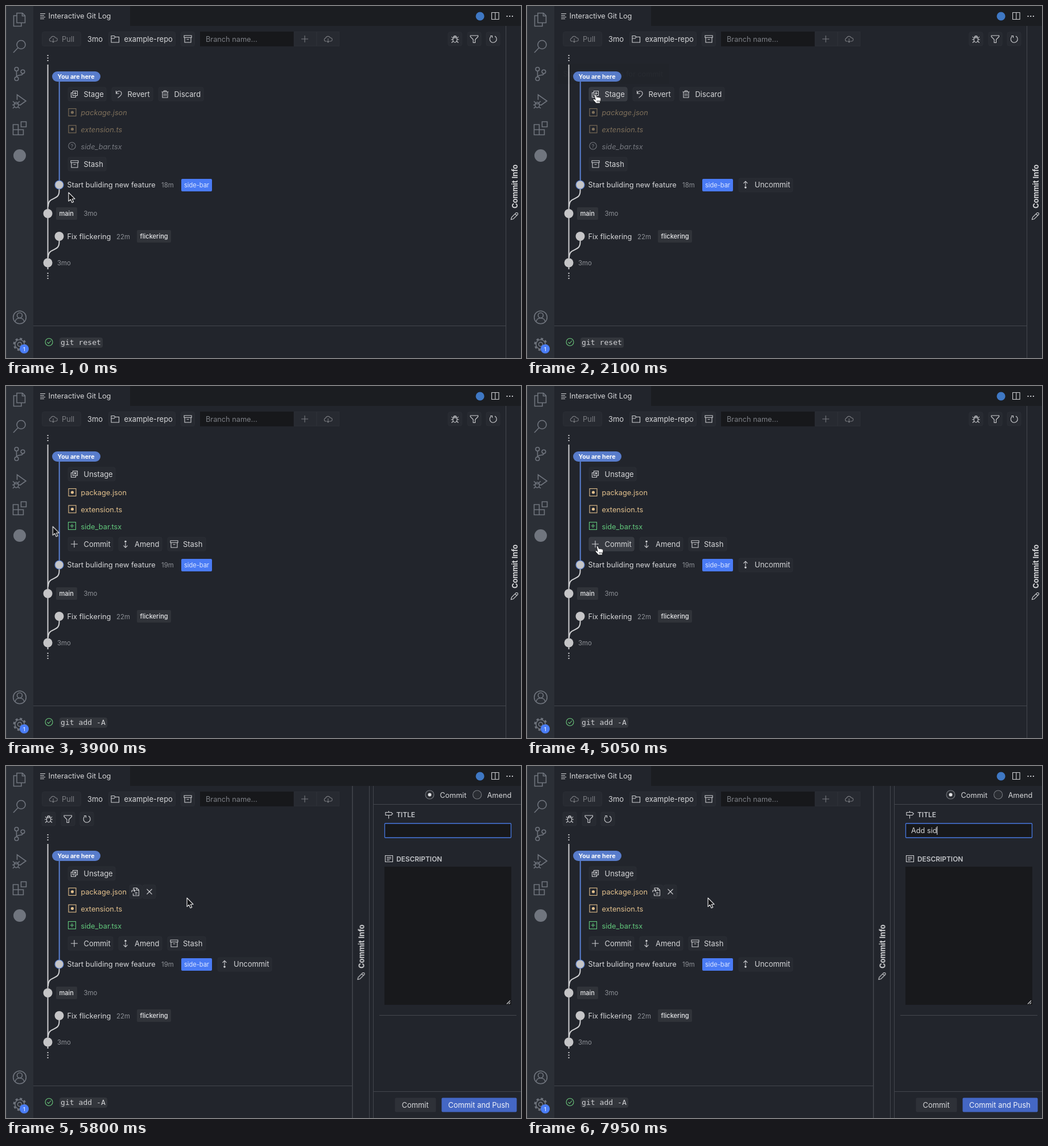
Recreate the animation shown at these times as an HTML page. Size 905 by 619 pixels, loop 8000 ms.

```html
<!DOCTYPE html>
<html lang="en">
<head>
<meta charset="utf-8">
<title>Interactive Git Log</title>
<style>
html, body { margin: 0; width: 100%; height: 100%; overflow: hidden; background: #22252c; }
svg { display: block; width: 100%; height: 100%; }
text { font: 12.75px Inter, "Open Sans", sans-serif; fill: #d6d7d9; white-space: pre; }
.btn text { font-size: 12.95px; }
.btn rect { fill: #272a31; stroke: #2b2e35; }
.btn.hot rect { fill: #373a41; stroke: #3b3e45; }
.small, .tag { font-size: 11.4px; fill: #8d9096; }
.tag { font-size: 11.05px; font-weight: 500; fill: #e6e7e9; }
.bold { font-weight: 700; }
.head { font-size: 11.9px; font-weight: 600; fill: #c3c5c9; }
.mono { font: 13.1px "DejaVu Sans Mono", monospace; fill: #d0d1d4; }
.dim { opacity: .48; }
.ital text { font-style: italic; }
.line { fill: none; stroke: currentColor; stroke-width: 1.1; }
.act { color: #70757e; }
.act .line { stroke-width: 1.6; }
.tool { color: #cfd0d3; }
.rule { stroke: #44474e; fill: none; }
.mod, .mod text { color: #e2c08d; fill: #e2c08d; }
.add, .add text { color: #62c87c; fill: #62c87c; }
.new, .new text { color: #d0d3da; fill: #d0d3da; }
.mod rect, .add rect, .new circle { fill: none; }

.sw { animation: 8s step-end infinite; }
.before { animation-name: before; }
.after { animation-name: after; }
.shift { animation-name: shift; }
.dock { animation-name: dock; }
.tools { animation-name: tools; }
.open { animation-name: open; }
.undo { animation-name: undo; }
.hot1 { animation-name: hot1; }
.hot2 { animation-name: hot2; }
.row { animation-name: row; }
.hand { animation-name: hand; }
.arrow { animation-name: arrow; }
.caret { animation-name: caret; }
.type { animation-name: type; }
.tip { animation: tip 8s linear infinite; }
.move { animation: move 8s linear infinite; }

@keyframes before { 0% { opacity: 1 } 41.25%, 100% { opacity: 0 } }
@keyframes after { 0% { opacity: 0 } 41.25%, 100% { opacity: 1 } }
@keyframes shift { 0% { transform: none } 65%, 100% { transform: translate(0, 34px) } }
@keyframes dock { 0% { transform: none } 65%, 100% { transform: translate(-269.5px, 0) } }
@keyframes tools { 0% { transform: none } 65%, 100% { transform: translate(-714px, 35px) } }
@keyframes open { 0% { opacity: 0 } 65%, 100% { opacity: 1 } }
@keyframes undo { 0% { opacity: 0 } 15% { opacity: 1 } 43.125% { opacity: 0 } 50.625%, 100% { opacity: 1 } }
@keyframes hot1 { 0% { opacity: 0 } 20% { opacity: 1 } 41.25%, 100% { opacity: 0 } }
@keyframes hot2 { 0% { opacity: 0 } 58.125% { opacity: 1 } 65%, 100% { opacity: 0 } }
@keyframes row { 0% { opacity: 0 } 70.625%, 100% { opacity: 1 } }
@keyframes hand { 0% { opacity: 0 } 20% { opacity: 1 } 41.875% { opacity: 0 } 58.125% { opacity: 1 } 65.625%, 100% { opacity: 0 } }
@keyframes arrow { 0% { opacity: 1 } 20% { opacity: 0 } 41.875% { opacity: 1 } 58.125% { opacity: 0 } 65.625%, 100% { opacity: 1 } }
@keyframes caret { 0% { opacity: 0 } 65.625% { opacity: 1 } 71.875% { opacity: 0 } 75.625%, 100% { opacity: 1 } }
@keyframes type {
  0% { transform: none }
  81.25% { transform: translate(8.7px, 0) }
  84.375% { transform: translate(16.5px, 0) }
  87.5% { transform: translate(24.3px, 0) }
  91.875% { transform: translate(27.9px, 0) }
  94.375% { transform: translate(34.6px, 0) }
  96.875% { transform: translate(37.7px, 0) }
  98.75%, 100% { transform: translate(45.3px, 0) }
}
@keyframes tip { 0%, 26.2% { opacity: 0 } 28.75%, 41.24% { opacity: 1 } 41.25%, 100% { opacity: 0 } }
@keyframes move {
  0%, 14.3% { transform: translate(110px, 328px) }
  15% { transform: translate(105px, 308px) }
  16.25% { transform: translate(88px, 234px) }
  18.125% { transform: translate(95px, 186px) }
  20% { transform: translate(115px, 161px) }
  21.875%, 41.25% { transform: translate(121px, 156px) }
  43.125% { transform: translate(84px, 182px) }
  45% { transform: translate(57px, 222px) }
  46.875% { transform: translate(62px, 246px) }
  48.75% { transform: translate(82px, 247px) }
  50% { transform: translate(103px, 254px) }
  51.25%, 56.5% { transform: translate(117px, 263px) }
  58.125% { transform: translate(122px, 276px) }
  60%, 65% { transform: translate(125px, 282px) }
  66.5% { transform: translate(152px, 278px) }
  69% { transform: translate(255px, 250px) }
  71% { transform: translate(306px, 235px) }
  72.5%, 100% { transform: translate(318px, 232px) }
}
</style>
</head>
<body>
<svg viewBox="0 0 905 619" preserveAspectRatio="none">
<defs>
  <g id="cloud" class="line"><path d="M-3 4H-4.5A2.8 2.8 0 0 1-4.3-1.5A4.3 4.3 0 0 1 3.8-2A3 3 0 0 1 4.5 4H3M0-1V6M-2.4 3.6L0 6L2.4 3.6"/></g>
  <g id="box" class="line"><path d="M-6.5-6H6.5V-2.5H-6.5ZM-5.5-2.5V6H5.5V-2.5M-2 .7H2"/></g>
  <g id="plus" class="line"><path d="M-6 0H6M0-6V6"/></g>
  <g id="bug" class="line"><ellipse cy="1" rx="3.6" ry="5"/><path d="M-3-2H3M-2.5-3A2.5 2.5 0 0 1 2.5-3M-3.5 1H-7M3.5 1H7M-3.3-1L-6-4M3.3-1L6-4M-3 4L-6 6.5M3 4L6 6.5"/></g>
  <g id="stage" class="line"><path d="M-2.5-5.5H5.5V2.5H-2.5ZM-2.5-2.5H-5.5V5.5H2.5V2.5"/></g>
  <g id="down" class="line"><path d="M0-2V6M-3.5 2.7L0 6.2L3.5 2.7"/><circle cy="-4.5" r="1.2" fill="currentColor"/></g>
  <g id="dot"><rect class="line" x="-6.5" y="-6.5" width="13" height="13"/><circle r="2.6"/></g>
  <g id="fork"><path d="M20 0V6C20 25 .5 14 .5 34" fill="none" stroke="#cfd0d2" stroke-width="2"/></g>
</defs>

<rect width="905" height="619" fill="#22252c"/>
<rect x="218" width="687" height="35" fill="#1b1d21"/>
<rect width="48" height="619" fill="#2b2f36"/>
<path d="M.5 0V619" stroke="#3a3e45"/>

<!-- activity bar -->
<g class="act">
  <g class="line">
    <path d="M19 12.5H29L33.500 17V29.500H19ZM28.500 12.500V17.500H33.500M19 17H13.500V35.500H27V29.500"/>
    <circle cx="26.500" cy="68" r="7.500"/><path d="M21 73.500L13 82"/>
    <circle cx="18.500" cy="111" r="3.300"/><circle cx="18.500" cy="128" r="3.300"/><circle cx="29.500" cy="115.500" r="3.300"/>
    <path d="M18.500 114.500V124.500M29.500 119C29.500 123 20 120 18.500 124.500"/>
    <path d="M19.500 165V156L35 167L24.500 174.500"/>
    <ellipse cx="18" cy="174" rx="3.800" ry="4.800"/><path d="M14.500 172H21.500M14 174H11M22 174H25M15 170L12 167.500M21 170L24 167.500M15 177L12 180M21 177L24 180"/>
    <path d="M12.500 208.500H21.500V217.500H12.500ZM12.500 217.500H21.500V226.500H12.500ZM21.500 217.500H30.500V226.500H21.500ZM26.500 203.500H35.500V212.500H26.500Z"/>
    <circle cx="24" cy="547.500" r="11.300"/><circle cx="24" cy="544" r="4.500"/><path d="M16 555.500C17 546.500 31 546.500 32 555.500"/>
    <circle cx="24" cy="595" r="3.600"/><circle cx="24" cy="595" r="8.200"/><circle cx="24" cy="595" r="10" stroke-width="3" stroke-dasharray="4 3.854"/>
  </g>
  <circle cx="24" cy="263" r="11" fill="#70757e"/>
  <circle cx="32" cy="603" r="8" fill="#4a7df5"/><text x="32" y="606.500" text-anchor="middle" style="font-size:9.500px;fill:#fff">1</text>
</g>

<!-- title bar -->
<g class="tool">
  <path class="line" d="M60 13.500H69M60 16.500H67M60 19.500H69M60 22.500H67"/>
  <text x="74.500" y="22">Interactive Git Log</text>
  <circle cx="833" cy="18" r="7.500" fill="#3f78c4"/>
  <path class="line" d="M853.500 11.500H866V23.500H853.500ZM859.750 11.500V23.500"/>
  <path d="M879.500 18h2m2.700 0h2m2.700 0h2" stroke="currentColor" stroke-width="2"/>
</g>

<!-- toolbar -->
<g class="tool">
  <g class="btn">
    <rect x="63.500" y="45.500" width="68" height="25" rx="3"/>
    <g class="dim"><use href="#cloud" x="83" y="58"/><text x="98" y="62.500">Pull</text></g>
    <text x="143" y="62.500">3mo</text>
    <rect x="180.500" y="45.500" width="117" height="25" rx="3"/>
    <path class="line" d="M185 52.500H190L192 54.500H198.500V64H185ZM185 57H190L192 54.500"/>
    <text x="207.500" y="62.500">example-repo</text>
    <rect x="307.500" y="45.500" width="24" height="25" rx="3"/><use href="#box" x="319.500" y="58"/>
  </g>
  <rect x="341" y="45" width="164.500" height="26" fill="#17181b"/>
  <text x="351" y="62.500" style="fill:#7c7f85">Branch name...</text>
  <g class="btn">
    <rect x="506.500" y="45.500" width="39" height="25"/><rect x="546.500" y="45.500" width="39" height="25"/>
    <g class="dim"><use href="#plus" x="525" y="58"/><use href="#cloud" x="566" y="58"/></g>
  </g>
  <g class="btn sw tools">
    <rect x="777" y="46" width="24" height="24" rx="3"/><use href="#bug" x="789" y="58"/>
    <rect x="811" y="46" width="24" height="24" rx="3"/><path class="line" d="M816 52H829.500V54L824.500 59V64.500H821V59L816 54Z"/>
    <rect x="844" y="46" width="24" height="24" rx="3"/><path class="line" d="M852.500 53.500A6 6 0 1 0 859 53M851 52.500H854.500V56"/>
  </g>
</g>

<!-- commit tree -->
<g class="sw shift tool">
  <path d="M73.500 86v2m0 2.500v2m0 2.500v2M73.500 469v2m0 2.500v2m0 2.500v2" stroke="#cfd0d2" stroke-width="2"/>
  <path d="M73.500 103V463" stroke="#cfd0d2" stroke-width="2"/>
  <path d="M93.700 130V308" stroke="#5a80d2" stroke-width="2"/>
  <use href="#fork" x="73.500" y="319"/><use href="#fork" x="73.500" y="409"/>
  <g fill="#c5c5c7">
    <circle cx="93.500" cy="314.500" r="7.500" stroke="#5a80d2" stroke-width="1.200"/>
    <circle cx="73.500" cy="365" r="8"/><circle cx="93.500" cy="405" r="8"/><circle cx="73.500" cy="451.500" r="8"/>
  </g>
  <rect x="81" y="115" width="85" height="18" rx="9" fill="#587ccb"/>
  <text class="bold" x="90.500" y="128" style="font-size:10.700px;fill:#fff">You are here</text>

  <g class="sw before">
    <g class="btn">
      <rect x="109" y="143" width="67" height="24" rx="3"/>
      <g class="hot btn sw hot1"><rect x="109" y="143" width="67" height="24" rx="3"/></g>
      <use href="#stage" x="120" y="155"/><path class="line" d="M119 153.500H124M121.500 151V156"/><text x="136.500" y="159.500">Stage</text>
      <rect x="186" y="143" width="72" height="24" rx="3"/>
      <path class="line" d="M193.500 149V154H198.500M193.800 153.500C196 148 203 149 203 154C203 157 200 159 196.500 161.500"/><text x="213.500" y="159.500">Revert</text>
      <rect x="268" y="143" width="79" height="24" rx="3"/>
      <path class="line" d="M273.500 151H285.500M277.500 151V149H281.500V151M275 151V161H284V151M278 153.500V158.500M281 153.500V158.500"/><text x="295.500" y="159.500">Discard</text>
      <rect x="109" y="266" width="67" height="24" rx="3"/><use href="#box" x="120.500" y="278"/><text x="136.500" y="283">Stash</text>
    </g>
    <g class="dim ital">
      <g class="mod"><use href="#dot" x="116.500" y="187"/><text x="131.500" y="191.500">package.json</text>
        <use href="#dot" x="116.500" y="216.500"/><text x="131.500" y="221.500">extension.ts</text></g>
      <g class="new"><circle class="line" cx="116" cy="246" r="6.200"/><text x="116" y="249.500" text-anchor="middle" style="font-size:9.500px;font-style:normal">?</text>
        <text x="131.500" y="251.500">side_bar.tsx</text></g>
    </g>
    <text class="small" x="273" y="319">18m</text>
  </g>

  <g class="sw after">
    <g class="btn">
      <rect x="109" y="143" width="83" height="24" rx="3"/><use href="#stage" x="120" y="155"/><path class="line" d="M119.500 151.500L123.500 155.500M123.500 151.500L119.500 155.500"/><text x="136.500" y="159.500">Unstage</text>
      <rect x="109" y="266" width="79" height="24" rx="3"/>
      <g class="hot btn sw hot2"><rect x="109" y="266" width="79" height="24" rx="3"/></g>
      <use href="#plus" x="120" y="278"/><text x="136.500" y="283">Commit</text>
      <rect x="198" y="266" width="76" height="24" rx="3"/><use href="#down" x="210" y="278"/><text x="226" y="283">Amend</text>
      <rect x="284" y="266" width="67" height="24" rx="3"/><use href="#box" x="295.500" y="278"/><text x="311" y="283">Stash</text>
    </g>
    <g class="mod"><use href="#dot" x="116.500" y="187"/><text x="131.500" y="191.500">package.json</text>
      <use href="#dot" x="116.500" y="216.500"/><text x="131.500" y="221.500">extension.ts</text></g>
    <g class="add"><rect class="line" x="109.500" y="239.500" width="13" height="13"/><path class="line" d="M112.500 246H119.500M116 242.500V249.500"/><text x="131.500" y="251.500">side_bar.tsx</text></g>
    <text class="small" x="273" y="319">19m</text>
  </g>

  <g class="btn sw row">
    <rect x="217" y="175" width="22" height="24" rx="3"/><rect x="240" y="175" width="23" height="24" rx="3"/>
    <path class="line" d="M224 184V180.500H230L233.500 184V194H223.500V190M229.500 180.500V184.500H233.500M221 188V185H227M225 183L227.200 185L225 187M226.500 191H231M226.500 188.500H231"/>
    <path class="line" d="M247.500 182.500L256.500 191.500M256.500 182.500L247.500 191.500"/>
  </g>

  <text x="107.500" y="319.200">Start buliding new feature</text>
  <rect x="308" y="304" width="54" height="22" rx="2" fill="#4a7bf5"/><text class="tag" x="313" y="318.500" style="font-weight:400;fill:#dce6ff">side-bar</text>
  <g class="btn sw undo">
    <rect x="372" y="303" width="95" height="24" rx="3"/>
    <g transform="translate(384 314.500) scale(1 -1)"><use href="#down"/></g><text x="400" y="319.200">Uncommit</text>
  </g>
  <rect x="88" y="354" width="37" height="22" rx="2" fill="#303339"/><text class="tag" x="93.500" y="369">main</text>
  <text class="small" x="136.500" y="369">3mo</text>
  <text x="107.500" y="410">Fix flickering</text><text class="small" x="194" y="410">22m</text>
  <rect x="230" y="394" width="60" height="22" rx="2" fill="#303339"/><text class="tag" x="235.500" y="409">flickering</text>
  <text class="small" x="90" y="456">3mo</text>
</g>

<!-- footer -->
<path class="rule" d="M48 562.500H878"/>
<g class="line" style="color:#6ccb7d"><circle cx="75.500" cy="591" r="6.500"/><path d="M72.500 591.200L74.800 593.500L79 588.500"/></g>
<g class="sw before"><rect x="94" y="583" width="76" height="18" rx="4" fill="#33363c"/><text class="mono" x="96" y="596">git reset</text></g>
<g class="sw after"><rect x="94" y="583" width="84" height="18" rx="4" fill="#33363c"/><text class="mono" x="96" y="596">git add -A</text></g>

<!-- side drawer -->
<g class="sw dock tool">
  <rect x="878" y="35" width="300" height="584" fill="#22252c"/>
  <path class="rule" d="M878.500 35V619"/>
  <text class="bold" transform="translate(898.800 356) rotate(-90)" style="font-size:13px">Commit Info</text>
  <path class="line" d="M887.500 375.500L888.500 371.500L896.500 363.500Q900 363 899.500 366.500L891.500 374.500ZM894.500 365.500L897.500 368.500"/>
</g>
<g class="sw open tool">
  <path class="rule" d="M638.500 35V619M645.500 35V619M645 67.500H905M656 438.500H897M645 572.500H905"/>
  <g class="line"><circle cx="744.500" cy="50.500" r="7.500" stroke="#777a80" fill="#2a2d33"/><circle cx="828" cy="50.500" r="7.500" stroke="#777a80" fill="#2a2d33"/></g>
  <circle cx="744.500" cy="50.500" r="3" fill="#e4e5e7"/>
  <text x="762.500" y="55.500">Commit</text><text x="845.500" y="55.500">Amend</text>
  <path class="line" d="M667 81.500H677L679.500 84L677 86.500H667ZM672.500 79V81.500M672.500 86.500V92.500"/>
  <text class="head" x="686" y="90">TITLE</text>
  <rect x="665.500" y="101" width="222" height="25" rx="1" fill="#17181b" stroke="#4878e0" stroke-width="1.300"/>
  <text x="675" y="118">Add sid</text>
  <g class="sw type"><rect x="675" y="104" width="60" height="19" fill="#17181b"/><path class="sw caret" d="M675.500 106V121" stroke="#e4e5e7"/></g>
  <path class="line" d="M666.500 157.500H679.500V168.500H666.500ZM669 160.500H677M669 163H677M669 165.500H674"/>
  <text class="head" x="686" y="168">DESCRIPTION</text>
  <rect x="665" y="177" width="223" height="243" fill="#18191c"/>
  <path class="line" d="M880 418.500L886 412.500M883.500 418.500L886 416"/>
  <g class="btn">
    <rect x="683.500" y="583.500" width="72" height="25" rx="2" style="fill:#2e3138;stroke:none"/><text x="695.500" y="601">Commit</text>
    <rect x="765.500" y="583.500" width="132" height="25" rx="2" style="fill:#4467c4;stroke:none"/><text x="777" y="601" style="fill:#f2f4fa">Commit and Push</text>
  </g>
</g>

<!-- tooltip -->
<g class="tip">
  <path d="M53.500 101.500H249.500V137.500H146.500L142.500 141.500L138.500 137.500H53.500Z" fill="#1a1b1f" stroke="#32353b"/>
  <text x="63.500" y="124">Stage all changes for commit</text>
</g>

<!-- pointer -->
<g class="move">
  <path class="sw arrow" d="M0 0V15.300L3.500 12.100L6 17.700L8.700 16.500L6.300 11.200H11Z" fill="#101114" stroke="#f4f4f5" stroke-width="1.100" stroke-linejoin="round"/>
  <path class="sw hand" d="M-2.600 1C-3-.6-.8-1 0 .6L1.600 4.600C2.200 3.600 3.700 3.700 4.200 4.800C5 4 6.300 4.300 6.700 5.300C7.700 4.700 8.700 5.200 8.700 6.700C9 9.500 8.300 10.500 7.700 12L7.400 15H.3C-.6 13-4.200 10.600-4.700 8.700C-4.900 7.500-3 7.100-1.900 8.300L-.8 9Z" fill="#fff" stroke="#1a1b1f" stroke-width=".9" stroke-linejoin="round"/>
  <path class="sw hand" d="M2.200 10V13M4.200 10V13M6.200 10V13" stroke="#1a1b1f" stroke-width=".8"/>
</g>
</svg>
</body>
</html>
```
